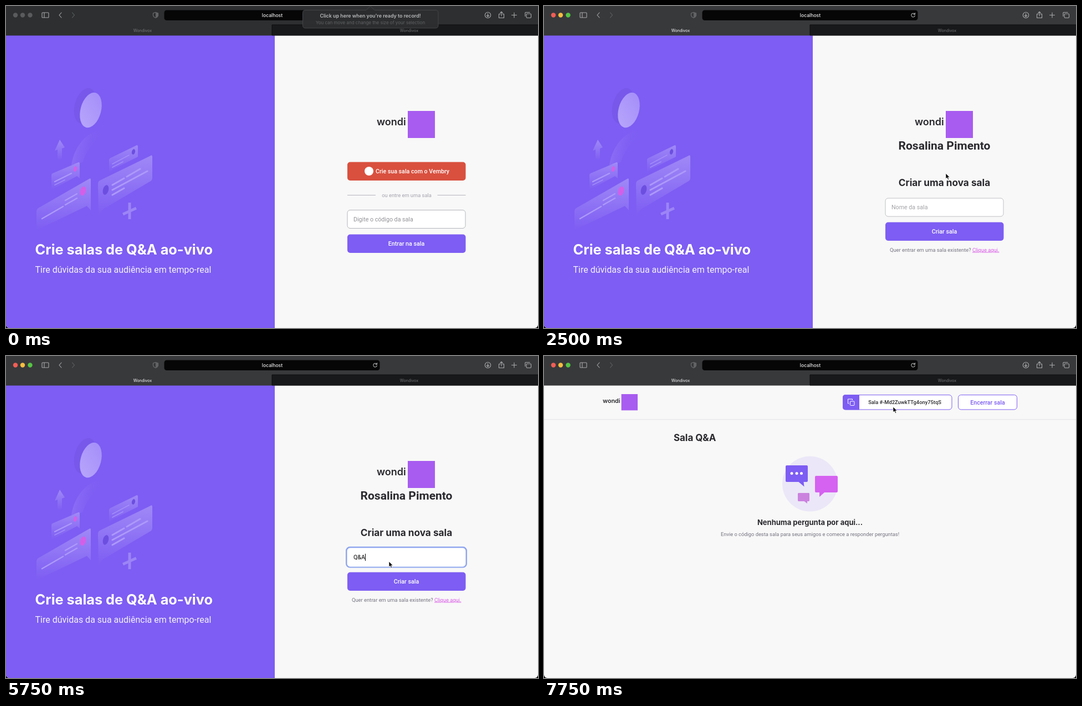
These frames come from a looping animation (960 px wide and 583 px high, 8 s). An HTML page:

```html
<!DOCTYPE html>
<html lang="pt-BR">
<head>
<meta charset="utf-8">
<title>Sala Q&amp;A</title>
<style>
  html, body { margin: 0; width: 100%; height: 100%; overflow: hidden; background: #000; }
  svg { display: block; width: 960px; height: 583px; border-radius: 0 0 6px 6px; }
  text { font-family: Roboto, sans-serif; font-size: 10.67px; white-space: pre; }
  .mid { text-anchor: middle; }
  .head, .ui { font-family: Inter, sans-serif; }
  .head { font-weight: 700; fill: #29292e; }
  .btn { font-weight: 500; fill: #fff; text-anchor: middle; }
  .small { font-size: 9.33px; }
  .icon { fill: none; stroke: #a9aaab; stroke-width: 1.1; stroke-linecap: round; stroke-linejoin: round; }
  .tab { font-size: 7.2px; text-anchor: middle; }
</style>
</head>
<body>
<svg viewBox="0 0 960 583">
  <defs>
    <linearGradient id="fade" x2="0" y2="1">
      <stop stop-color="#fff" stop-opacity=".27"/><stop offset="1" stop-color="#fff" stop-opacity="0"/>
    </linearGradient>
    <linearGradient id="face" x1=".7" x2=".2" y2="1">
      <stop stop-color="#a58ff9"/><stop offset="1" stop-color="#b7a5fb"/>
    </linearGradient>
    <linearGradient id="shade" x2="1" y2=".2">
      <stop stop-color="#a58bfa" stop-opacity=".5"/><stop offset="1" stop-color="#7d5df3" stop-opacity="0"/>
    </linearGradient>
    <g id="logo">
      <text class="ui" y="26" style="font-size:18px;font-weight:600" fill="#29292e">wondi</text>
      <rect x="56" width="49" height="49" fill="#a85cf0"/>
    </g>
  </defs>

  <rect width="960" height="583" fill="#f8f8f8"/>

  <g id="aside">
    <rect y="53" width="485" height="530" fill="#7d5df3"/>
    <ellipse cx="143" cy="181" rx="19" ry="33" transform="rotate(15 143 181)" fill="#6e50df" opacity=".4"/>
    <ellipse cx="153" cy="188.500" rx="18.500" ry="32.500" transform="rotate(15 153 188.500)" fill="url(#face)"/>
    <path d="M118 288C122 258 143 229 167 226Q177 226 174 232C155 248 143 267 139 283Z" fill="url(#shade)"/>
    <g fill="url(#fade)">
      <path d="M88 262L97 242L106 256L101 258V276L93 280V260Z"/>
      <path d="M82 306Q82 304 84 303L131 283Q133 283 133 285V312L128 308L82 333Z"/>
      <path d="M186 279Q186 276 189 275L236 252Q238 252 238 254V273L192 296L186 302Z"/>
      <path d="M55 371Q55 368 58 366L150 313Q153 311 153 314V370L146 362L55 406Z"/>
      <path d="M166 322Q166 318 169 316L261 271Q264 269 264 273V311Q264 315 261 317L175 368L167 380Z"/>
    </g>
    <path d="M211 377L235 366M223 356V386" stroke="#9c84f6" stroke-width="5" fill="none"/>
    <g stroke="#ad99f9" stroke-width="3" stroke-linecap="round">
      <path d="M107 352L128 340M107 360L128 348M65 385L103 363M88 318L118 303" stroke-width="2.500"/>
      <path d="M192 324L213 312M218 309L242 295M192 333L255 299M192 342L213 330"/>
      <path d="M192 286L222 270M192 292L211 282M88 324L106 315" stroke-width="1.800" opacity=".7"/>
    </g>
    <g fill="#d45fe8">
      <ellipse cx="139" cy="335" rx="5" ry="8.500" transform="rotate(15 139 335)"/>
      <ellipse cx="125" cy="295" rx="3" ry="5" transform="rotate(15 125 295)"/>
    </g>
    <g fill="#6c4fe0">
      <ellipse cx="180" cy="333" rx="5" ry="9" transform="rotate(15 180 333)"/>
      <ellipse cx="230" cy="264" rx="3" ry="5" transform="rotate(15 230 264)"/>
    </g>
    <text class="head" x="52.500" y="450" style="font-size:25.300px;fill:#fff">Crie salas de Q&amp;A ao-vivo</text>
    <text x="52.500" y="483" style="font-size:16px" fill="#f5f2ff">Tire dúvidas da sua audiência em tempo-real</text>
    <use href="#logo" x="669" y="190"/>
  </g>

  <g id="home">
    <rect id="signIn" x="616" y="282.500" width="213.500" height="33.500" rx="5"/>
    <circle cx="655" cy="299" r="8" fill="#fff"/>
    <text class="btn" x="733.500" y="303">Crie sua sala com o Vembry</text>
    <path d="M616 342.500H667M778.500 342.500H829.500" stroke="#b5b5be"/>
    <text class="small mid" x="723" y="346" fill="#a3a3ae">ou entre em uma sala</text>
    <rect x="616" y="369.500" width="213" height="33" rx="5" fill="#fff" stroke="#b4b5bb"/>
    <text x="627" y="390" fill="#929298">Digite o código da sala</text>
    <rect x="616" y="413.500" width="213.500" height="33.500" rx="5" fill="#7d5df3"/>
    <text class="btn" x="722.500" y="434">Entrar na sala</text>
  </g>

  <g id="create">
    <text class="mid" x="722.500" y="260" style="font-size:21px;font-weight:700" fill="#29292e">Rosalina Pimento</text>
    <text class="head mid" x="722.500" y="326" style="font-size:17.200px">Criar uma nova sala</text>
    <rect id="ring" x="614.500" y="346.500" width="216" height="35.500" rx="6" fill="none" stroke="#90a7ee" stroke-width="3"/>
    <rect id="field" x="616" y="348" width="213" height="33" rx="5" fill="#fff" stroke="#bfc0c5"/>
    <text id="hint" x="627" y="368" fill="#a3a3a8">Nome da sala</text>
    <text id="typed" x="627" y="368" fill="#000"></text>
    <path id="caret" stroke="#000" fill="none"/>
    <rect id="submit" x="616" y="391.500" width="213.500" height="33.500" rx="5"/>
    <text class="btn" x="722.500" y="412">Criar sala</text>
    <text class="small" x="624" y="444.500" fill="#737380">Quer entrar em uma sala existente? <tspan fill="#d85be6" text-decoration="underline">Clique aqui.</tspan></text>
  </g>

  <g id="room">
    <path d="M0 115H960" stroke="#e2e2e6"/>
    <use href="#logo" transform="translate(106 69) scale(.6)"/>
    <rect x="539.500" y="70.500" width="196.500" height="26.500" rx="5" fill="#fff" stroke="#7d5df3"/>
    <path d="M569 70V97.500H544Q539 97.500 539 92.500V75Q539 70 544 70Z" fill="#7d5df3"/>
    <g fill="none" stroke="#fff">
      <rect x="552.500" y="82" width="7.500" height="7.500" rx="1"/>
      <path d="M550.500 86H548.500V78H556.500V80"/>
    </g>
    <text class="small mid" x="651" y="87" font-weight="500" fill="#29292e">Sala #-Md2ZuwkTTg4ony75tqS</text>
    <rect x="747.500" y="70.500" width="106" height="26.500" rx="5" fill="#fff" stroke="#7d5df3"/>
    <text class="btn" x="800.500" y="87.500" style="fill:#7d5df3">Encerrar sala</text>
  </g>

  <g id="loading" stroke="#7d5df3" stroke-width="2">
    <path d="M495 164H498M555 185L556 192M492 236.500H497M507 243L506 248"/>
    <path d="M495 216.500H496M435 256H437M457 255H458M475 256H477" stroke="#d3d3d8" stroke-width="1"/>
  </g>

  <g id="empty">
    <text class="head" x="234" y="154" style="font-size:16.900px">Sala Q&amp;A</text>
    <circle cx="480" cy="231.500" r="50" fill="#ebe7f8"/>
    <path d="M438 198H474Q476 198 476 200V226Q476 228 474 228H468.500L469.500 236.500L459.500 228H438Q436 228 436 226V200Q436 198 438 198Z" fill="#7d5df3"/>
    <g fill="#fff"><circle cx="447" cy="212.500" r="2.500"/><circle cx="456" cy="212.500" r="2.500"/><circle cx="464.500" cy="212.500" r="2.500"/></g>
    <path d="M491 217H528Q530 217 530 219V245Q530 247 528 247H506L497 255V247H491Q489 247 489 245V219Q489 217 491 217Z" fill="#d562f0"/>
    <path d="M459 248H478L479 249V262L478 263H475V267L469.500 263H459L458 262V249Z" fill="#cb82df"/>
    <text class="head mid" x="480" y="306" style="font-size:13px">Nenhuma pergunta por aqui...</text>
    <text class="small mid" x="480" y="326" fill="#737380">Envie o código desta sala para seus amigos e comece a responder perguntas!</text>
  </g>

  <g id="browser">
    <rect id="bar" width="960" height="53.500"/>
    <rect x="480" y="34" width="480" height="19.500" fill="#18191a"/>
    <path d="M480 34V53M480 34H960" stroke="#0d0d0e"/>
    <g id="lights"><circle cx="17" cy="16.500" r="4.200"/><circle cx="30" cy="16.500" r="4.200"/><circle cx="43.500" cy="16.500" r="4.200"/></g>
    <g class="icon">
      <path d="M66 12H76Q77 12 77 13V20Q77 21 76 21H66Q65 21 65 20V13Q65 12 66 12ZM69 12V21M100 12L96 16.500L100 21"/>
      <path d="M119.500 12L123.500 16.500L119.500 21" stroke="#606264"/>
      <path d="M270 11.500L274.500 13V17Q274 20 270 21.500Q266 20 265.500 17V13Z" stroke="#707274"/>
      <path d="M270 11.500L274.500 13V17Q274 20 270 21.500Z" fill="#606264" stroke="none"/>
      <circle cx="869.500" cy="16.500" r="5.200"/>
      <path d="M869.500 13.500V19M867.300 17L869.500 19.300L871.700 17"/>
      <path d="M892 14.500H889.500V21.500H898.500V14.500H896M894 18V10.500M891.800 12.500L894 10.300L896.200 12.500"/>
      <path d="M917 12V21M912.500 16.500H921.500"/>
      <rect x="939" y="14" width="8.500" height="7.500" rx="1.500"/>
      <path d="M936.800 18.500V12.500Q936.800 11.500 937.800 11.500H945"/>
    </g>
    <rect x="285.500" y="7.500" width="389" height="18.500" rx="4.500" fill="#060607"/>
    <text class="ui mid" x="480.500" y="20" style="font-size:8.600px;font-weight:500" fill="#e9e9e9">localhost</text>
    <path id="reload" class="icon" d="M669 15A3.300 3.300 0 1 0 669.300 17.500M669.500 12.500V15.200H666.800"/>
    <text id="tabTitle" class="ui tab" x="246.500" y="46.500">Wondivox</text>
    <text class="ui tab" x="727.500" y="46.500" fill="#747678">Wondivox</text>
  </g>

  <g id="tip">
    <path d="M540 7.500H650L657.500 0L665 7.500H775Q780 7.500 780 12.500V35Q780 40 775 40H540Q535.500 40 535.500 35V12.500Q535.500 7.500 540 7.500Z" fill="#2c2e2f" fill-opacity=".96" stroke="#424446"/>
    <text class="ui mid" x="657.500" y="21" style="font-size:8.900px;font-weight:600" fill="#b8b9ba">Click up here when you're ready to record!</text>
    <text class="ui mid" x="657.500" y="32.500" style="font-size:8px" fill="#606264">You can move and change the size of your selection</text>
  </g>

  <path id="cursor" d="M0 0V9.800L2.300 7.800L4 11.500L5.600 10.800L4 7.200H7Z" fill="#000" stroke="#fff" stroke-width=".7"/>
</svg>

<script>
const LOOP = 8000, STEP = 250;
const el = id => document.getElementById(id);
const show = (id, on) => { el(id).style.display = on ? "" : "none"; };
const paint = (id, fill) => el(id).setAttribute("fill", fill);

// Pointer path: time, x, y
const path = [
  [1750, 720, 326], [2250, 725, 303], [2750, 725, 303], [3250, 698, 361], [3500, 691, 372],
  [5750, 691, 372], [6250, 712, 424], [6500, 707, 409], [6750, 707, 409],
  [7000, 703, 390], [7500, 642, 140], [7750, 630, 92]
];

function pointerAt(t) {
  const next = path.findIndex(p => p[0] > t);
  if (next < 0) return path[path.length - 1].slice(1);
  if (next === 0) return path[0].slice(1);
  const [t0, x0, y0] = path[next - 1], [t1, x1, y1] = path[next];
  const k = (t - t0) / (t1 - t0);
  return [x0 + (x1 - x0) * k, y0 + (y1 - y0) * k];
}

function draw(now) {
  const t = Math.floor(now % LOOP / STEP) * STEP;
  const active = t >= 1500;
  paint("bar", active ? "#38393b" : "#2d2f30");
  paint("tabTitle", active ? "#fff" : "#77797b");
  ["#f25e55", "#f6bd3e", "#55c544"].forEach((c, i) =>
    el("lights").children[i].setAttribute("fill", active ? c : "#595b5d"));
  show("reload", active);
  el("tip").style.opacity = Math.max(0, 1 - t / 1250);

  show("aside", t < 6750);
  show("home", t < 2500);
  show("create", t >= 2500 && t < 6750);
  show("room", t >= 6750);
  show("loading", t >= 6750 && t < 7000);
  show("empty", t >= 7000);

  paint("signIn", t >= 2250 ? "#c24a3a" : "#d9503f");
  paint("submit", t >= 6250 ? "#7052d8" : "#7d5df3");

  const typed = "Q&A".slice(0, t < 4000 ? 0 : t < 5000 ? 1 : t < 5500 ? 2 : 3);
  const focused = t >= 3250 && t < 6500;
  el("typed").textContent = typed;
  show("hint", !typed);
  show("ring", focused);
  el("field").setAttribute("stroke", focused ? "#fff" : "#bfc0c5");
  const caretX = 627.5 + (typed ? el("typed").getComputedTextLength() : 0);
  el("caret").setAttribute("d", `M${caretX} 358V371`);
  show("caret", focused && !(t >= 4500 && t < 5000) && !(t >= 6000));

  show("cursor", t >= 1750 && !(t >= 4000 && t < 5750));
  el("cursor").setAttribute("transform", `translate(${pointerAt(t)})`);
}

const start = performance.now();
function tick() {
  draw(performance.now() - start);
  requestAnimationFrame(tick);
}
tick();
</script>
</body>
</html>
```
